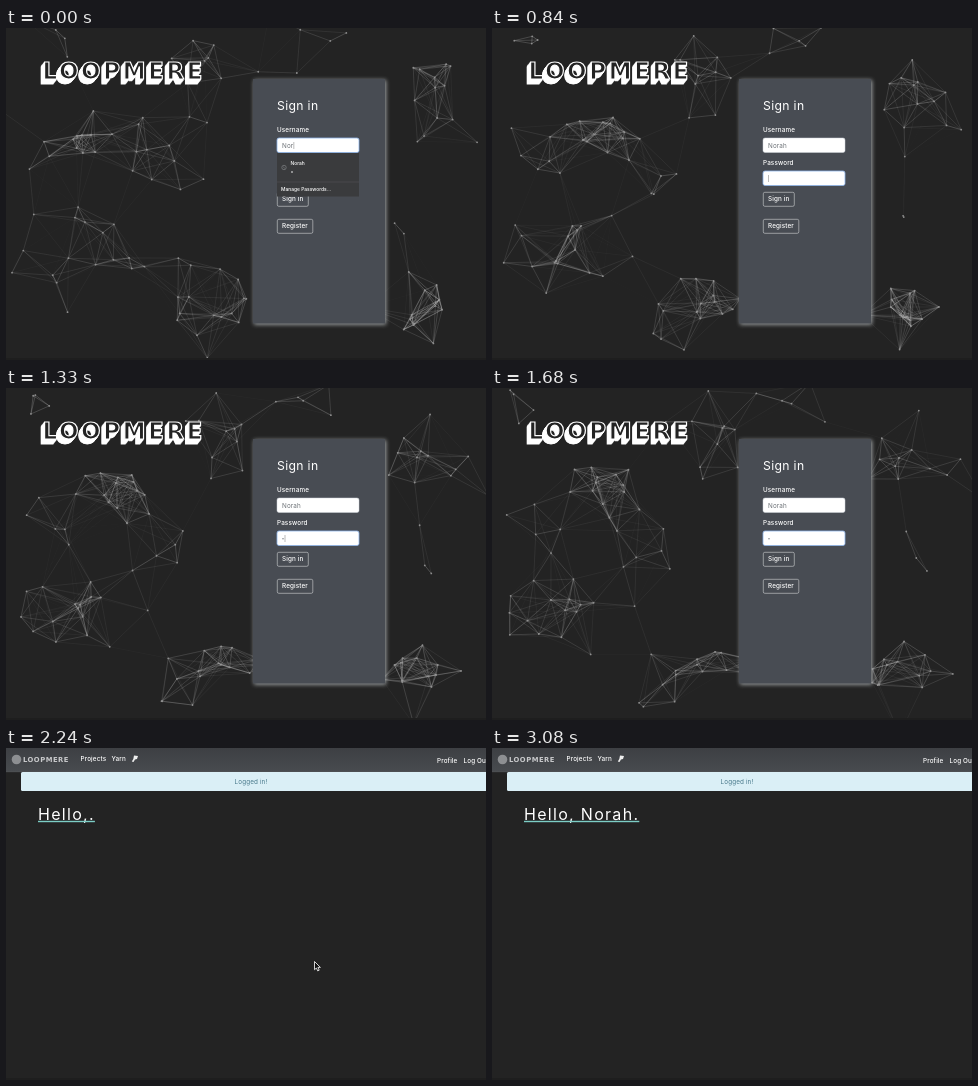
An HTML page with a canvas for the animation above (3430 ms loop, 480x332 px).

```html
<!DOCTYPE html>
<html lang="en">
<head>
<meta charset="utf-8">
<title>Sign in</title>
<style>
html, body { margin: 0; width: 100%; height: 100%; overflow: hidden; background: #232323; }
canvas, svg { position: absolute; left: 0; top: 0; width: 480px; height: 332px; }
text { font-family: Inter, "Open Sans", sans-serif; font-size: 6.3px; letter-spacing: .14px; fill: #fff; white-space: pre; }
.logo { font: 900 23px "DejaVu Sans", sans-serif; }
.logo text { font: inherit; letter-spacing: 2.6px; stroke: #fff; stroke-width: .8; }
.logo text:last-child { fill: #232323; stroke-width: 1.2; }
.panel { filter: drop-shadow(1px 1px 2px #a4a8aa); }
.title { font-size: 12.2px; letter-spacing: .35px; }
.field { fill: #fff; stroke: #ccd2d8; stroke-width: .5; }
.focus { stroke: #8db4ea; stroke-width: .8; }
.typed { fill: #6c7176; }
.label { font-weight: 500; }
.button { fill: none; stroke: #d0d2d4; stroke-width: .6; }
.small { font-size: 4.9px; font-weight: 500; letter-spacing: 0; }
.mid { text-anchor: middle; }
.brand { font: 900 6.8px "DejaVu Sans", sans-serif; letter-spacing: .5px; fill: #c9cacc; }
.hello { font-size: 16px; letter-spacing: 1.3px; }
</style>
</head>
<body>
<canvas id="net" width="480" height="332"></canvas>
<svg viewBox="0 0 480 332">
  <defs>
    <linearGradient id="bar" x2="0" y2="1">
      <stop stop-color="#3d3f43"/><stop offset="1" stop-color="#484b4f"/>
    </linearGradient>
  </defs>
  <rect y="330" width="480" height="2" fill="#1e1e1e"/>

  <g id="login">
    <g class="logo" id="logo"></g>
    <rect class="panel" x="247" y="51" width="132" height="244.500" fill="#484c53"/>
    <text class="title" x="271" y="81.500">Sign in</text>
    <text class="label" x="271" y="104">Username</text>
    <rect class="field" id="userBox" x="271" y="110" width="82" height="14.500" rx="2"/>
    <text class="typed" id="user" x="276" y="119.600"></text>
    <g id="password">
      <text class="label" x="271" y="137">Password</text>
      <rect class="field" id="passBox" x="271" y="143" width="82" height="14.500" rx="2"/>
      <circle id="dot" cx="277" cy="150.700" r=".7" fill="#6c7176"/>
    </g>
    <rect class="button" x="271.300" y="164.300" width="31" height="14" rx="1.500"/>
    <text class="label mid" x="286.800" y="173.300">Sign in</text>
    <rect class="button" x="271.300" y="191.300" width="35.500" height="14" rx="1.500"/>
    <text class="label mid" x="289" y="200.300">Register</text>
    <g id="popup">
      <rect x="271" y="125" width="82" height="43.500" fill="#3a3b3d"/>
      <circle cx="278" cy="139.500" r="2.200" fill="none" stroke="#77797c" stroke-width=".8"/>
      <path d="M276.800 138.500l2.400 2.200" stroke="#77797c" stroke-width=".7"/>
      <text class="small" x="284.500" y="137">Norah</text>
      <circle cx="286" cy="144" r=".8" fill="#fff"/>
      <path d="M271 154h82" stroke="#515254" stroke-width=".6"/>
      <text class="small" x="275" y="163">Manage Passwords...</text>
    </g>
    <path id="caret" stroke="#777" stroke-width=".5"/>
  </g>

  <g id="home">
    <rect width="480" height="23.500" fill="url(#bar)"/>
    <path d="M0 23.700h480" stroke="#66696d" stroke-width=".6"/>
    <circle cx="10.500" cy="11.500" r="4.800" fill="#8d8f92"/>
    <text class="brand" x="17" y="14.100">LOOPMERE</text>
    <text class="label" x="74.500" y="13.200">Projects</text>
    <text class="label" x="105.500" y="13.200">Yarn</text>
    <path d="M128 7.500l4 .5-1 3-2 .5-1.500 2.500-1.700-.5 1.500-2.500z" fill="#eee"/>
    <text class="label" x="431" y="14.700">Profile</text>
    <text class="label" x="457.500" y="14.700">Log Out</text>
    <rect x="15" y="24" width="470" height="19" rx="1.500" fill="#daeff6"/>
    <text class="mid" x="245" y="35.700" style="fill:#47788a">Logged in!</text>
    <text class="hello" id="hello" x="32" y="71.700"></text>
    <rect id="under" x="32" y="72.800" height="1.400" fill="#7ccdc5"/>
    <path id="mouse" d="M0 0v8.200l1.900-1.700 1.300 2.900 1.500-.7-1.300-2.800h2.500z" fill="#111" stroke="#fff" stroke-width=".8"/>
  </g>
</svg>
<script>
const LOOP = 3430, STEP = 70, SUBMIT = 1680, HOME = 1820, LAST = 3080;
const NAME = "Norah", BRAND = "LOOPMERE", REACH = 66;
const $ = id => document.getElementById(id);
const ctx = $("net").getContext("2d");

const clamp = v => Math.min(1, Math.max(0, v));
const mix = (a, b, p) => a + (b - a) * p;
const show = (id, on) => $(id).style.display = on ? "" : "none";

let seed = 11;
function random() {
  seed = (seed * 16807) % 2147483647;
  return seed / 2147483647;
}

// A loose group of drifting nodes, denser towards its middle.
function swarm(count, x, y, rx, ry) {
  return Array.from({ length: count }, () => {
    const a = random() * 2 * Math.PI, r = random() ** 0.7;
    const heading = random() * 2 * Math.PI, speed = 12 + random() * 22;
    return {
      x: x + rx * r * Math.cos(a), y: y + ry * r * Math.sin(a),
      vx: speed * Math.cos(heading), vy: speed * Math.sin(heading)
    };
  });
}

const nodes = [
  swarm(4, 32, 12, 24, 9),
  swarm(10, 208, 50, 36, 50),
  swarm(19, 86, 112, 74, 40),
  swarm(4, 178, 165, 26, 34),
  swarm(17, 80, 225, 72, 46),
  swarm(16, 205, 284, 56, 40),
  swarm(5, 308, 14, 36, 22),
  swarm(13, 432, 78, 46, 60),
  swarm(2, 417, 186, 9, 5),
  swarm(14, 405, 292, 68, 32)
].flat();

// Extruded lettering: stacked copies, the dark face last.
for (let i = 9; i >= 0; i--) {
  const t = document.createElementNS("http://www.w3.org/2000/svg", "text");
  t.setAttribute("x", 36.5 - i * 0.4);
  t.setAttribute("y", 51 + i * 0.5);
  t.textContent = BRAND;
  $("logo").append(t);
}

function drawNet(t) {
  ctx.clearRect(0, 0, 480, 332);
  const s = (t - SUBMIT / 2) / 1000;
  const pts = nodes.map(n => [n.x + n.vx * s, n.y + n.vy * s]);
  ctx.lineWidth = 0.5;
  pts.forEach(([x, y], i) => {
    for (const [u, v] of pts.slice(i + 1)) {
      const d = Math.hypot(x - u, y - v);
      if (d >= REACH) continue;
      ctx.strokeStyle = `rgba(255,255,255,${0.48 * (1 - d / REACH)})`;
      ctx.beginPath();
      ctx.moveTo(x, y);
      ctx.lineTo(u, v);
      ctx.stroke();
    }
  });
  ctx.fillStyle = "#8f8f8f";
  for (const [x, y] of pts) {
    ctx.beginPath();
    ctx.arc(x, y, 0.9, 0, 7);
    ctx.fill();
  }
}

function drawLogin(t) {
  const onPass = t >= 350, dotted = t >= 1260;
  $("user").textContent = NAME.slice(0, 3 + t / STEP);
  $("userBox").classList.toggle("focus", t < 420);
  $("passBox").classList.toggle("focus", t > 350);
  show("popup", t < 280);
  show("password", t >= 280);
  show("dot", dotted);
  show("caret", t < 1540);
  const x = onPass ? (dotted ? 279 : 276.5) : 276.5 + $("user").getComputedTextLength();
  $("caret").setAttribute("d", `M${x} ${onPass ? 147 : 114}v7`);
}

function drawHome(t) {
  const typed = `Hello, ${NAME}`.slice(0, Math.floor((t - SUBMIT) / 93));
  $("hello").textContent = typed + ".";
  $("under").setAttribute("width", $("hello").getComputedTextLength());
  // The pointer rests, glides down, then leaves past the bottom edge.
  const glide = clamp((t - 2310) / 560), leave = clamp((t - 2870) / 210);
  const x = mix(308.5, 273, glide) - 23 * leave;
  const y = mix(213.5, 309, glide) + 25 * leave;
  $("mouse").setAttribute("transform", `translate(${x} ${y})`);
}

function draw(now) {
  let t = Math.min(LAST, Math.floor((now % LOOP) / STEP) * STEP);
  // The page stands still while the form is sent.
  if (t > SUBMIT && t < HOME) t = SUBMIT;
  const home = t >= HOME;
  show("net", !home);
  show("login", !home);
  show("home", home);
  if (home) drawHome(t);
  else { drawNet(t); drawLogin(t); }
}

const start = performance.now();
function tick() {
  draw(performance.now() - start);
  requestAnimationFrame(tick);
}
tick();
</script>
</body>
</html>
```
